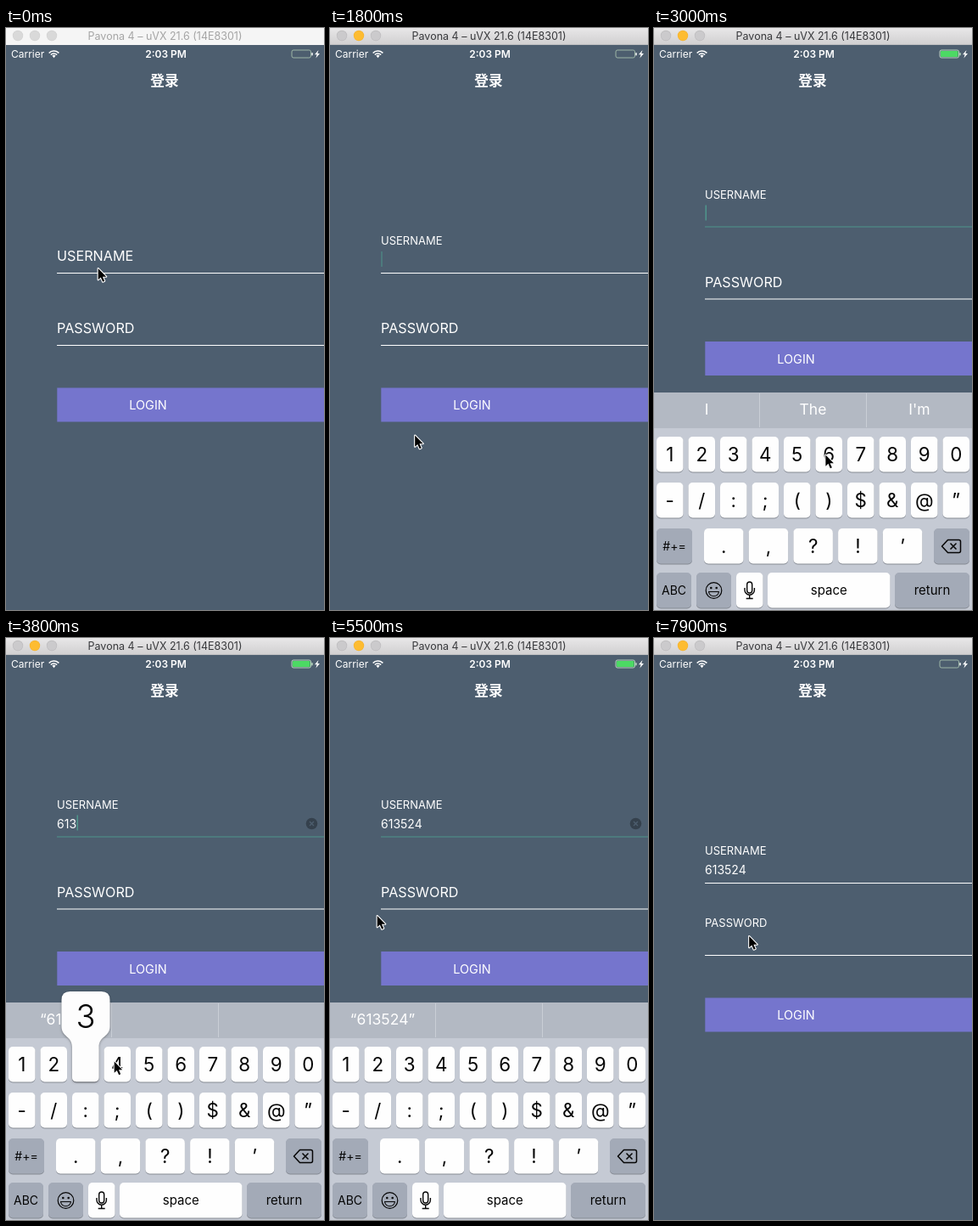
An HTML page with a canvas that plays this animation: 375x685 px, repeating every 8000 ms.

```html
<!DOCTYPE html>
<html lang="en">
<head>
<meta charset="utf-8">
<title>Login form</title>
<style>
html, body { margin: 0; width: 100%; height: 100%; overflow: hidden; background: #4d5e6f; }
canvas { display: block; width: 375px; height: 685px; }
</style>
</head>
<body>
<canvas id="stage"></canvas>
<script>
const W = 375, H = 685, LOOP = 8000, STEP = 100;
const canvas = document.getElementById('stage');
const ctx = canvas.getContext('2d');
const dpr = window.devicePixelRatio || 1;
canvas.width = W * dpr;
canvas.height = H * dpr;

const BG = '#4d5e6f', GREEN = '#4f968b', WHITE = '#fff', INK = '#050505';
const SANS = 'Inter, Roboto, sans-serif';
const USER = '613524';
const PRESSES = [3050, 3350, 3700, 4150, 4500, 4850];
const HOLD = 150;
const T = { active: 500, user: 1000, show: 1850, numbers: 2700, hide: 5700, pass: 7000 };

// Pointer stops: time, x, y
const PATH = [
  [0, 108, 282.5], [300, 108, 282.5], [600, 114, 330], [850, 106, 272], [1150, 105, 275],
  [1800, 99.5, 479], [2200, 41.5, 625.5], [2550, 22, 655], [2720, 22, 655],
  [3020, 204, 500], [3080, 204, 500], [3330, 20, 500], [3380, 20, 500],
  [3640, 94, 502], [3720, 95, 502], [3800, 127, 498], [4120, 168, 500], [4180, 168, 500],
  [4470, 57, 500], [4530, 57, 500], [4820, 131, 500], [4900, 131, 500],
  [5400, 55, 326.5], [5700, 55, 326.5], [6100, 78.5, 340.5], [6600, 96, 375],
  [6900, 112, 356], [7200, 112, 356], [7900, 111.5, 350.5], [8000, 111.5, 350.5]
];

const clamp = v => Math.max(0, Math.min(1, v));
const mix = (a, b, p) => a + (b - a) * p;
const smooth = p => p * p * (3 - 2 * p);
const easeOut = p => 1 - (1 - p) ** 4;

function pointer(t) {
  let i = 0;
  while (i < PATH.length - 2 && t >= PATH[i + 1][0]) i++;
  const [t0, x0, y0] = PATH[i], [t1, x1, y1] = PATH[i + 1];
  const p = smooth(clamp((t - t0) / (t1 - t0)));
  return [mix(x0, x1, p), mix(y0, y1, p)];
}

function rect(x, y, w, h, color) {
  ctx.fillStyle = color;
  ctx.fillRect(x, y, w, h);
}

function round(x, y, w, h, r, color) {
  ctx.beginPath();
  ctx.roundRect(x, y, w, h, r);
  ctx.fillStyle = color;
  ctx.fill();
}

function disc(x, y, r, color) {
  ctx.beginPath();
  ctx.arc(x, y, r, 0, 7);
  ctx.fillStyle = color;
  ctx.fill();
}

function poly(points, color) {
  ctx.beginPath();
  for (let i = 0; i < points.length; i += 2) ctx.lineTo(points[i], points[i + 1]);
  ctx.closePath();
  ctx.fillStyle = color;
  ctx.fill();
}

function stroke(d, color, width) {
  ctx.strokeStyle = color;
  ctx.lineWidth = width;
  ctx.stroke(new Path2D(d));
}

function text(s, x, base, size, color = WHITE, align = 'center', weight = 400, family = SANS) {
  ctx.font = `${weight} ${size}px ${family}`;
  ctx.textAlign = align;
  ctx.fillStyle = color;
  ctx.fillText(s, x, base);
}

function titleBar(active) {
  if (active) {
    const g = ctx.createLinearGradient(0, 0, 0, 20);
    g.addColorStop(0, '#e8e7e8');
    g.addColorStop(1, '#d0cfd0');
    rect(0, 0, W, 20, g);
    rect(0, 19, W, 1, '#bfbfc1');
  } else {
    rect(0, 0, W, 20, '#f5f5f5');
  }
  for (let i = 0; i < 3; i++) {
    const lit = active && i === 1;
    disc(14 + 20 * i, 9, 6.2, lit ? '#f3b230' : active ? '#bcbbbd' : '#d2d2d2');
    disc(14 + 20 * i, 9, 5.6, lit ? '#fdbc31' : active ? '#cbcacc' : '#d9d9d9');
  }
  text('Pavona 4 – uVX 21.6 (14E8301)', 187.5, 14, 12.5, active ? '#38393c' : '#a5a5a5');
}

function statusBar(charged) {
  text('Carrier', 6, 35, 12, WHITE, 'left');
  ctx.lineCap = 'butt';
  for (const r of [8, 5]) {
    ctx.beginPath();
    ctx.arc(56.5, 35, r, -Math.PI * 0.76, -Math.PI * 0.24);
    ctx.strokeStyle = WHITE;
    ctx.lineWidth = 1.6;
    ctx.stroke();
  }
  poly([56.5, 35.2, 54.4, 32.6, 56.5, 31.6, 58.6, 32.6], WHITE);
  text('2:03 PM', 188.5, 35, 12, WHITE, 'center', 600);
  const edge = charged ? '#b9d8bf' : '#9db5a6';
  ctx.beginPath();
  ctx.roundRect(337, 26, 22.5, 9, 2);
  ctx.strokeStyle = edge;
  ctx.lineWidth = 1;
  ctx.stroke();
  if (charged) round(338, 27, 20.5, 7, 1, '#4cd964');
  round(360.3, 29, 1.5, 3.5, 0.7, charged ? edge : WHITE);
  poly([368.5, 26, 364, 31.2, 366.6, 31.2, 365.4, 35.5, 370, 30, 367.3, 30], WHITE);
}

// The label shrinks and rises above its line as p goes from 0 to 1.
function field(label, y, p, lineColor) {
  text(label, 60, mix(y - 13.7, y - 33, p), mix(16.2, 13, p), WHITE, 'left');
  rect(60, y, W - 60, 1, lineColor);
}

function caret(x, y, width) {
  rect(x, y - 25, width, 18, GREEN);
}

function form(t, lift, kb, typed) {
  const editing = t >= T.user && t < T.hide;
  const y1 = 288 - lift, y2 = 373 - lift;
  const thick = kb ? 1.5 : 1;
  const up = start => smooth(clamp((t - start) / 250));
  field('USERNAME', y1, up(T.user), editing && kb ? GREEN : WHITE);
  field('PASSWORD', y2, up(T.pass), WHITE);
  text(typed, 60, y1 - 10, 14, WHITE, 'left');
  ctx.font = `14px ${SANS}`;
  const end = 60.5 + ctx.measureText(typed).width;
  const base = PRESSES.filter(p => p <= t).pop() || 800;
  if (editing && (t - base) % 1000 < 500) caret(end, y1, thick);
  if (t >= T.pass && t - T.pass < 500) caret(60.5, y2, thick);
  if (editing && typed) {
    disc(360.5, y1 - 15, 6.8, '#35414d');
    stroke(`M358 ${y1 - 17.5}l5 5m0 -5l-5 5`, BG, 1.3);
  }
  rect(60.3, 423.5 - lift, W - 60, 40, '#7575cd');
  text('LOGIN', 167.5, 449 - lift, 14.5);
}

function key(x, y, w, label, size = 22.4, dark = false) {
  round(x, y + 1, w, 41.5, 5, '#868b94');
  round(x, y, w, 41.5, 5, dark ? '#a3aab7' : '#fefefe');
  if (label) text(label, x + w / 2, y + 21 + size * 0.36, size, INK);
}

function keyRow(labels, x, y, w = 31.5, pitch = 37.5) {
  [...labels].forEach((s, i) => key(x + pitch * i, y, w, s));
}

function deleteIcon(x, y) {
  ctx.lineJoin = 'round';
  stroke(`M${x - 11} ${y}l7 -7.5h13q2 0 2 2v11q0 2 -2 2h-13z`, INK, 1.5);
  stroke(`M${x - 1} ${y - 3.5}l7 7m0 -7l-7 7`, INK, 1.5);
}

function smileIcon(x, y) {
  ctx.beginPath();
  ctx.arc(x, y, 9.3, 0, 7);
  ctx.strokeStyle = INK;
  ctx.lineWidth = 1.2;
  ctx.stroke();
  disc(x - 3.2, y - 3, 1.3, INK);
  disc(x + 3.2, y - 3, 1.3, INK);
  stroke(`M${x - 6} ${y + 1.5}h12q-1 5.2 -6 5.2t-6 -5.2z`, INK, 1.1);
}

function micIcon(x, y) {
  ctx.beginPath();
  ctx.roundRect(x - 3, y - 10, 6, 13, 3);
  ctx.strokeStyle = INK;
  ctx.lineWidth = 1.4;
  ctx.stroke();
  stroke(`M${x - 5.7} ${y - 3}v2.5a5.7 5.7 0 0 0 11.4 0v-2.5M${x} ${y + 5.5}v4m-4 0h8`, INK, 1.4);
}

function popup(digit, top) {
  const x = 3 + 37.5 * (digit - 1), r = x + 31.5;
  const l = Math.max(2, x - 12.5), b = l + 57;
  const y = top - 13;
  const d = `M${l + 10} ${y}H${b - 10}Q${b} ${y} ${b} ${y + 10}V${y + 41}` +
    `C${b} ${y + 54} ${r} ${y + 52} ${r} ${y + 66}V${y + 101}Q${r} ${y + 106} ${r - 5} ${y + 106}` +
    `H${x + 5}Q${x} ${y + 106} ${x} ${y + 101}V${y + 66}` +
    `C${x} ${y + 52} ${l} ${y + 54} ${l} ${y + 41}V${y + 10}Q${l} ${y} ${l + 10} ${y}Z`;
  ctx.save();
  ctx.shadowColor = 'rgba(0,0,0,.35)';
  ctx.shadowBlur = 3 * dpr;
  ctx.shadowOffsetY = dpr;
  ctx.fillStyle = '#fdfdfd';
  ctx.fill(new Path2D(d));
  ctx.restore();
  text(digit, (l + b) / 2, y + 43, 38, INK, 'center', 300);
}

function keyboard(t, top, typed) {
  const numbers = t >= T.numbers;
  const rows = [52, 106, 160, 212].map(v => top + v);
  rect(0, top, W, 300, '#c5cad4');
  rect(0, top, W, 42, '#b3b9c3');
  for (const x of [124, 250]) rect(x, top + 1, 1, 40, '#c9ced6');
  const hints = typed ? [`“${typed}”`] : ['I', 'The', "I'm"];
  hints.forEach((s, i) => text(s, 62 + 125.5 * i, top + 26, 17.5));

  if (numbers) {
    keyRow('1234567890', 3, rows[0]);
    keyRow('-/:;()$&@”', 3, rows[1]);
    keyRow('.,?!’', 59, rows[2], 46.5, 52.7);
    key(3, rows[2], 42, '#+=', 14, true);
  } else {
    keyRow('QWERTYUIOP', 3, rows[0]);
    keyRow('ASDFGHJKL', 21.5, rows[1]);
    keyRow('ZXCVBNM', 59, rows[2]);
    key(3, rows[2], 42);
    const y = rows[2] + 12;
    poly([24, y, 34.5, y + 10.5, 28.5, y + 10.5, 28.5, y + 18, 19.5, y + 18, 19.5, y + 10.5, 13.5, y + 10.5], INK);
  }
  key(330, rows[2], 42, '', 0, true);
  deleteIcon(350.5, rows[2] + 21);
  key(3, rows[3], 41, numbers ? 'ABC' : '123', numbers ? 14 : 15, true);
  key(50, rows[3], 41, '', 0, true);
  smileIcon(70.5, rows[3] + 21);
  key(97, rows[3], 31.5);
  micIcon(112.7, rows[3] + 21);
  key(134, rows[3], 144.5, 'space', 15);
  key(284, rows[3], 88, 'return', 15, true);

  const n = PRESSES.findIndex(p => t >= p && t < p + HOLD);
  if (n >= 0) popup(+USER[n], top);
}

function arrow(x, y) {
  ctx.save();
  ctx.translate(x, y);
  const shape = new Path2D('M.7 .6V13.8L3.8 10.9L6.2 16.2L8.2 15.3L5.9 10.2H10.2Z');
  ctx.lineJoin = 'round';
  ctx.strokeStyle = WHITE;
  ctx.lineWidth = 2.2;
  ctx.stroke(shape);
  ctx.fillStyle = '#000';
  ctx.fill(shape);
  ctx.restore();
}

function draw(t) {
  const show = easeOut(clamp((t - T.show) / 470));
  const hide = easeOut(clamp((t - T.hide + 50) / 400));
  const open = t < T.hide ? show : 1 - hide;
  const kb = open > 0.001;
  const typed = USER.slice(0, PRESSES.filter(p => p <= t).length);

  ctx.setTransform(dpr, 0, 0, dpr, 0, 0);
  rect(0, 0, W, H, BG);
  titleBar(t >= T.active);
  statusBar(kb);
  text('登录', 187, 68, 16.7, WHITE, 'center', 700, '"Noto Sans CJK SC", "Noto Sans CJK", sans-serif');
  form(t, 54.5 * open, kb, typed);
  if (kb) keyboard(t, H - 256 * open, typed);
  arrow(...pointer(t));
}

const start = performance.now();
function tick() {
  const t = (performance.now() - start) % LOOP;
  draw(Math.floor(t / STEP) * STEP);
  requestAnimationFrame(tick);
}
tick();
</script>
</body>
</html>
```
